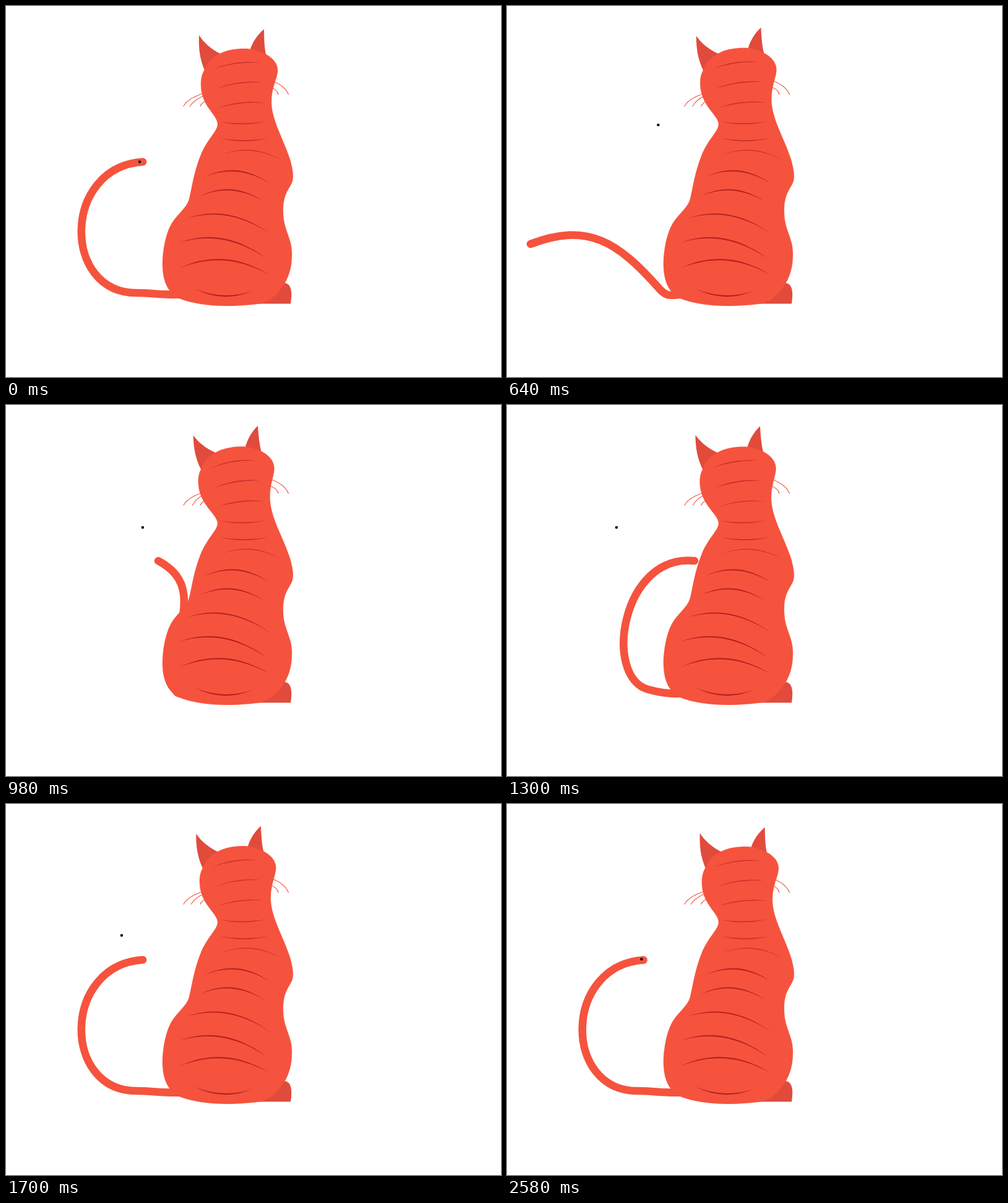
An HTML page that plays this animation: 800x600 px, repeating every 2600 ms.

```html
<!DOCTYPE html>
<html lang="en">
<head>
<meta charset="utf-8">
<title>Cat</title>
<style>
html, body { margin: 0; width: 100%; height: 100%; overflow: hidden; background: #fff; }
svg { display: block; width: 100vw; height: 100vh; }
</style>
</head>
<body>
<svg id="stage" viewBox="0 0 800 600"></svg>
<script>
const LOOP = 2600, RESTART = 2560, STEP = 325;
const COAT = '#f5533d', SHADE = '#e14b3c';
const stage = document.getElementById('stage');

function add(tag, attrs) {
  const el = document.createElementNS('http://www.w3.org/2000/svg', tag);
  for (const k in attrs) el.setAttribute(k, attrs[k]);
  return stage.appendChild(el);
}

// Everything above the neck leans left, more so towards the ears.
const NECK = 190;
function bend(d, lean) {
  return d.replace(/([\d.]+),([\d.]+)/g, (_, x, y) => {
    const w = lean * Math.max(0, NECK - y) / 147;
    return (x - 9.8 * w).toFixed(2) + ',' + (y - 0.057 * (x - 347) * w).toFixed(2);
  });
}

const bent = [];
function addBent(d, attrs) {
  bent.push({ el: add('path', attrs), d });
}

const line = { fill: 'none', stroke: COAT, 'stroke-linecap': 'round' };
const tail = add('path', { ...line, 'stroke-width': 12.6 });
const whisker = d => add('path', { ...line, 'stroke-width': 1.2, d });
whisker('M328,139Q295,147 287,162');
const midWhisker = whisker('');
whisker('M328,151Q316,156 314,162');
whisker('M424,119Q450,127 456.5,143');
whisker('M424,130Q438,134 440,143');

// Ears and foot reach under the body.
addBent('M312,47C311,68 313,85 321,104L350,100L346,77C332,70 320,60 312,47Z', { fill: SHADE });
addBent('M417,37.5C407,46 400,56 395,69L405,85L420,78C418,70 417,55 417,37.5Z', { fill: SHADE });
addBent('M400,481.5L460,481.5C463,462 461,450 451,448L430,455Z', { fill: SHADE });
addBent('M385,69C398,69 404,71 420,78C433,85 440,95 439,106C438,118 429,132 429,155' +
  'C429,184 448,214 459,248C464,266 466,279 461,288C454,301 447,309 448,336' +
  'C449,364 463,376 462,403C462,422 457,438 450,449C440,465 428,476 413,481' +
  'C398,483 378,485 356,485C328,485 300,481 280,473C262,464 252,446 253,412' +
  'C254,388 260,366 266,355C274,339 293,326 296,312C301,292 303,271 314,243' +
  'C324,216 342,203 342,191C342,176 315,162 315,127C315,117 317,109 321,103' +
  'C326,90 334,83 346,77C357,71 372,69 385,69Z',
  { fill: COAT, stroke: COAT, 'stroke-opacity': 0.35, 'stroke-width': 0.8 });

// A stripe is a thin lens from its left end, given width, drop and sag.
function stripe(x, y, width, drop, sag, thick, fill) {
  const end = `${x + width},${y + drop}`;
  const mid = s => `${x + width / 2},${y + drop / 2 + 2 * s}`;
  addBent(`M${x},${y}Q${mid(sag - thick / 2)} ${end}Q${mid(sag + thick / 2)} ${x},${y}Z`, { fill });
}
const fine = (sag, ...marks) => marks.forEach(m => stripe(...m, sag, 1.5, '#c52d29'));
const bold = (sag, ...marks) => marks.forEach(m => stripe(...m, sag, 2.1, '#b32023'));
fine(-4.5, [335, 102, 76, -10], [339, 134, 76, -10], [342, 165, 79, -8]);
fine(4, [345, 187, 77, -1], [346, 214, 77, 0]);
fine(-14, [342, 243, 108, 9]);
bold(-15, [320, 277, 106, 10], [312, 308, 106, 9]);
bold(-19, [288, 345, 141, 25], [280, 383, 142, 26], [280, 424, 146, 11]);
bold(10, [304, 457, 94, 4]);

const dot = add('circle', { r: 2.2, fill: '#000' });

// Tail poses, one per step: tip, two handles, joint near the body.
const REST = [221, 252, 91, 261, 90, 464, 211, 464];
const TAIL = [
  REST,
  [47, 386, 50, 440, 95, 492, 225, 480],
  [38, 385, 130, 350, 178, 380, 246, 457],
  [246, 252, 303, 283, 290, 325, 275, 400],
  [303, 252, 185, 240, 155, 440, 228, 460],
  REST
];
// Heart-like round trip of the dot, one point per step.
const DOT = [[216, 252], [252, 222], [244, 192], [221.5, 198], [177, 198], [180, 203], [216, 252]];

const at = (keys, i) => keys[Math.max(0, Math.min(keys.length - 1, i))];

function ease(keys, t) {
  const i = Math.floor(t / STEP), s = t / STEP - i;
  const e = s * s * s * (s * (6 * s - 15) + 10);
  return at(keys, i).map((v, n) => v + (at(keys, i + 1)[n] - v) * e);
}

function spline(keys, t) {
  const u = Math.min(t / STEP, keys.length - 1), i = Math.floor(u), s = u - i;
  const [a, b, c, d] = [-1, 0, 1, 2].map(k => at(keys, i + k));
  return b.map((v, n) => v + s / 2 * (c[n] - a[n] +
    s * (2 * a[n] - 5 * v + 4 * c[n] - d[n] + s * (3 * (v - c[n]) + d[n] - a[n]))));
}

function draw(time) {
  let t = time % LOOP;
  if (t >= RESTART) t -= RESTART;
  const lean = t < 1000 ? t / 1000 : Math.max(0, 1 - (t - 1000) / 1400);
  for (const { el, d } of bent) el.setAttribute('d', bend(d, lean));
  midWhisker.setAttribute('d', `M328,141C310,149 ${301 + 4 * lean},155 ${297.5 + 4 * lean},162`);

  const [x, y, ax, ay, bx, by, jx, jy] = ease(TAIL, t);
  const onX = jx + 0.18 * (jx - bx), onY = jy + 0.18 * (jy - by);
  tail.setAttribute('d', `M${x},${y}C${ax},${ay} ${bx},${by} ${jx},${jy}C${onX},${onY} 264,468 282,466.5`);

  const [cx, cy] = spline(DOT, t);
  dot.setAttribute('cx', cx);
  dot.setAttribute('cy', cy);
}

const start = performance.now();
function tick() {
  draw(performance.now() - start);
  requestAnimationFrame(tick);
}
draw(0);
requestAnimationFrame(tick);
</script>
</body>
</html>
```
